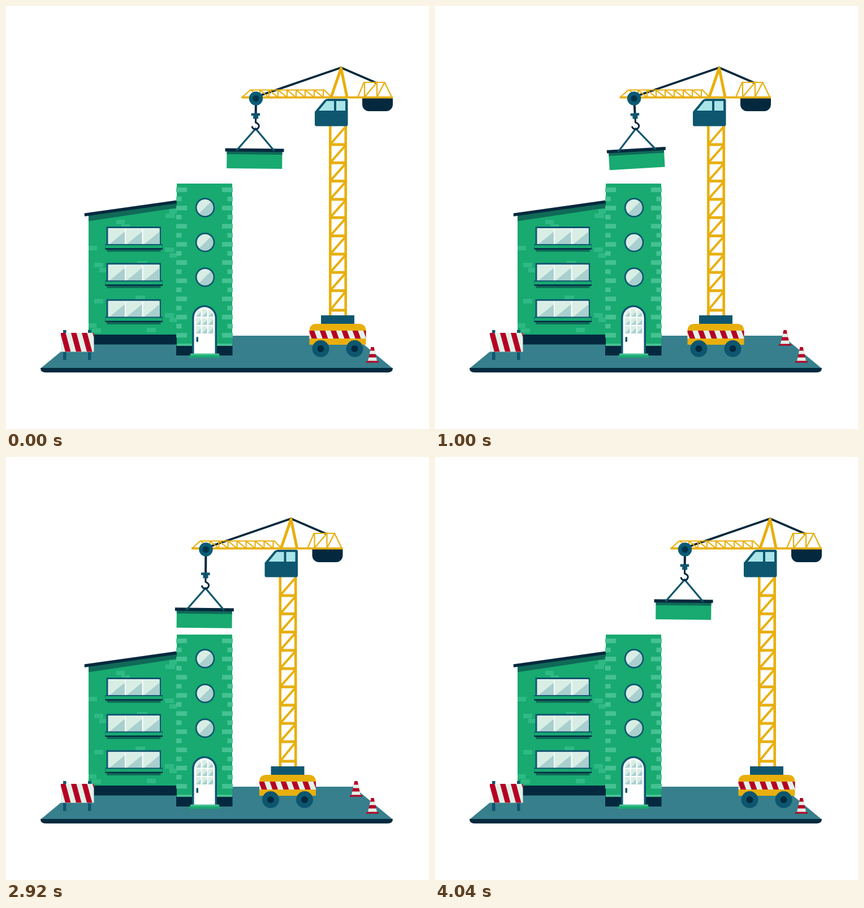
An HTML page that plays this animation: 748x748 px, repeating every 4320 ms.

```html
<!DOCTYPE html>
<html lang="en">
<head>
<meta charset="utf-8">
<title>Crane</title>
<style>
  html, body { margin: 0; width: 100%; height: 100%; overflow: hidden; background: #fff; }
  svg { display: block; width: 100vw; height: 100vh; }
</style>
</head>
<body>
<svg id="stage" viewBox="0 0 748 748"></svg>
<script>
const C = {
  green: '#18aa70', quoin: '#46c193', brick: '#2fb984', shade: '#0f6a57',
  navy: '#04293e', teal: '#0e566f', ground: '#377f8c', yellow: '#e8af0c',
  red: '#b50024', cream: '#e2f1e9', glass: '#d8eee5', tint: '#a9cfcf', sky: '#a8e4e8'
};
const LOOP = 4320, STEP = 40;

const rect = (x, y, w, h, fill, r = 0) =>
  `<rect x="${x}" y="${y}" width="${w}" height="${h}" rx="${r}" fill="${fill}"/>`;
const disc = (x, y, r, fill) => `<circle cx="${x}" cy="${y}" r="${r}" fill="${fill}"/>`;
const shape = (d, fill) => `<path d="${d}" fill="${fill}"/>`;
const line = (d, color, width, more = '') =>
  `<path d="${d}" fill="none" stroke="${color}" stroke-width="${width}" ${more}/>`;
const times = (n, fn) => Array.from({ length: n }, (_, i) => fn(i)).join('');

const ROWS = [390, 454.3, 518.5];
const ROUNDS = [356.5, 418, 479.5];
const PANES = [181, 211.5, 242.5];
const DOOR_GLASS = 'M336 549.5C336 541 343 536 351 536S366.500 541 366.500 549.500V579H336Z';

function stripes(x, y, w, h, period, lean, id) {
  return `<clipPath id="${id}"><rect x="${x}" y="${y}" width="${w}" height="${h}"/></clipPath>` +
    rect(x, y, w, h, C.cream) + `<g clip-path="url(#${id})">` +
    times(8, i => shape(`M${x - 1 + (i - 1) * period} ${y}h${period / 2}l${lean} ${h}h${-period / 2}Z`, C.red)) + '</g>';
}

function cone(x, y) {
  return `<g transform="translate(${x} ${y})">` +
    shape('M-2.500 0H2.500L8.500 27H-8.500Z', C.red) +
    shape('M-4 6.500H4L5.400 12.500H-5.400Z', C.cream) +
    shape('M-6.700 18.500H6.700L8 24.500H-8Z', C.cream) +
    rect(-11, 25, 22, 2.6, C.red) + '</g>';
}

function wideWindow(y) {
  return rect(177.5, y, 96.500, 33, C.teal) + rect(180.5, y + 3, 91, 30, '#fff') +
    PANES.map(x => rect(x, y + 4, 29, 28, C.glass) +
      shape(`M${x + 1} ${y + 32}L${x + 29} ${y + 9}V${y + 32}Z`, C.tint)).join('') +
    rect(178.5, y + 40, 95, 4.5, C.shade) +
    rect(175.5, y + 31, 101.500, 9.5, C.teal) + rect(176, y + 33, 100.500, 5, C.green) +
    rect(175.5, y + 38.5, 101.500, 2, C.navy);
}

function roundWindow(y) {
  return disc(352, y, 17.3, C.teal) + disc(352, y, 14.5, C.glass) +
    shape(`M341.700 ${y + 10.2}L362.300 ${y - 10.2}A14.500 14.500 0 0 1 341.700 ${y + 10.2}Z`, C.tint);
}

function house() {
  const bricks = [[195, 378, 15], [204, 386, 15], [282, 367, 17], [289, 359, 13], [146, 424, 15],
    [281, 427, 16], [289, 437, 13], [156, 454, 16], [165, 463, 12], [232, 451, 18], [229, 512, 17],
    [156, 518, 16], [281, 543, 16], [289, 551, 13], [146, 561, 14], [152, 570, 16], [249, 569, 16]];
  return shape('M146 371L302 348V581H146Z', C.green) +
    bricks.map(([x, y, w]) => rect(x, y, w, 8, C.brick)).join('') +
    shape('M146 370L302 348V357L146 380.500Z', C.shade) +
    shape('M138.500 366.500L302 343.500V349L139 372Z', C.navy) +
    rect(150, 581, 152, 17.5, C.navy) + ROWS.map(wideWindow).join('');
}

function tower() {
  return rect(302, 314, 98, 286, C.green) +
    times(17, i => {
      const y = 321 + i * 16.07, w = i % 2 ? 9.5 : 19;
      return rect(301, y, w, 8.2, C.quoin) + rect(401 - w, y, w, 8.2, C.quoin);
    }) +
    rect(301, 600, 99.500, 18, C.navy) + rect(302, 597, 98, 4, C.quoin) +
    ROUNDS.map(roundWindow).join('') + door();
}

function door() {
  const muntins = 'M345.500 534V579M356.500 534V579M336 550.500H367M336 565H367';
  return shape('M329 616V551A22 22 0 0 1 373 551V616Z', C.teal) +
    shape('M332.500 616V551A18.500 18.500 0 0 1 369.500 551V616Z', '#fff') +
    shape(DOOR_GLASS, C.glass) +
    `<g clip-path="url(#doorGlass)">` +
    times(3, r => times(3, c => shape(
      `M${336 + c * 10.5} ${550 + r * 14.5}l9.500 -10v10Z`, C.tint))) + '</g>' +
    line(muntins, '#fff', 2) + rect(336.5, 585, 3.5, 9, C.teal, 1.5) +
    rect(326, 614.5, 51, 4, C.quoin) + rect(324, 617.5, 54, 4.5, C.green);
}

function barrier() {
  return rect(101, 573, 5.5, 53, C.teal) + rect(145, 573, 5.5, 53, C.teal) +
    stripes(97, 578, 58.5, 33.5, 19, 9, 'board');
}

function load() {
  return rect(391.5, 256, 98, 31.5, C.green) + rect(391.5, 256, 98, 6.5, C.shade) +
    rect(388.5, 252, 104, 5.7, C.navy) +
    line('M408.500 256L442 217L475.500 256', C.teal, 3.2) +
    rect(434, 189.5, 15.5, 4.5, C.teal) + rect(437.5, 193, 9, 6.5, C.teal) +
    line('M442 199V206C447 208 449 211 447 215A6.300 6.300 0 0 1 435.500 212.500', C.navy, 3);
}

function crane() {
  const rungs = [212, ...Array.from({ length: 9 }, (_, i) => 245 + i * 32.3), 538];
  const mast = rungs.slice(1).map((y, i) =>
    line(`M573 ${y}H601`, C.yellow, 5) + line(`M574 ${y - 1}L600 ${rungs[i] + 2}`, C.yellow, 4)).join('');
  const lattice = times(8, i => `M${433 + i * 16} 148.500l16 13V148.500`);
  return line('M450 158L592.500 109L655 136', C.navy, 3.8) +
    mast + line('M573.300 210V548M600.700 210V548', C.yellow, 4.6) +
    line('M418 161L432 148.500H563L575 161' + lattice, C.yellow, 2.2) +
    line('M622 161L633 135H669.500L682 161M634 135V161L656 135V161L669 136', C.yellow, 2.2) +
    shape('M630 163H684V174A12 12 0 0 1 672 186H642A12 12 0 0 1 630 174Z', C.navy) +
    line('M575 161L592.500 110L603 161', C.yellow, 5, 'stroke-linejoin="round"') +
    line('M416.500 161.700H684', C.yellow, 3.8) +
    shape('M546 187L563 166.500Q565.500 164 569 164H601.500Q604.500 164 604.500 167V209.500Q604.500 212.500 601.500 212.500H549Q546 212.500 546 209.500Z', C.teal) +
    shape('M553 185L567 168H580V185Z', C.sky) + rect(584, 168, 16, 17, C.sky) +
    rect(557, 547, 59, 16, C.teal) +
    shape('M536.500 599V574Q537 562 549 562H624Q636 562 636.500 574V599Z', C.yellow) +
    stripes(536.5, 574, 100, 14, 19.3, 5, 'band') +
    [556.5, 616.5].map(x => disc(x, 606, 15, C.teal) + disc(x, 606, 6, C.navy)).join('') +
    `<g id="swing"><path id="rope" stroke="${C.navy}" stroke-width="4"/><g id="load">${load()}</g></g>` +
    disc(442, 163.5, 12.2, '#0a5c76') + disc(442, 163.5, 5.8, '#053348');
}

document.getElementById('stage').innerHTML =
  `<clipPath id="doorGlass"><path d="${DOOR_GLASS}"/></clipPath>` +
  `<clipPath id="allGlass"><path d="${DOOR_GLASS}"/>` +
  ROUNDS.map(y => disc(352, y, 14)).join('') +
  ROWS.map(y => PANES.map(x => rect(x, y + 4, 29, 27)).join('')).join('') + '</clipPath>' +
  shape('M131 583H614L684 641H61Z', C.ground) +
  shape('M61 640H684Q684 648 675 648H70Q61 648 61 640Z', C.navy) +
  house() + tower() + barrier() + cone(619, 573) +
  `<g clip-path="url(#allGlass)"><path id="glint" fill="#fff" opacity=".55"/></g>` +
  `<g id="crane">${crane()}</g>` + cone(648, 603);

// Tables of [ms, value]
const TRAVEL = [[340, 0], [440, 2], [500, 2.8], [520, 2.5], [610, -7], [760, -32], [880, -65],
  [920, -76], [960, -85], [1000, -90], [1040, -91.2], [1080, -90.4], [1160, -88.5],
  [3040, -88.5], [3140, -90.5], [3200, -90.5], [3280, -84], [3320, -80], [3450, -56.5],
  [3570, -23.5], [3650, -3.5], [3690, 1.5], [3730, 2.8], [3770, 2], [3850, 0]];
const ANGLE = [[320, .6], [520, 1.9], [640, 2.5], [760, 2], [880, 0], [1000, -3.3], [1050, -3.4],
  [1200, 0], [1300, 2], [1400, 1.5], [1560, .2], [1680, 0], [2740, 0], [2920, .6], [3120, 1.6],
  [3260, 2.1], [3320, 1.9], [3440, .8], [3600, -2], [3690, -3], [3800, 0], [3880, 1.3], [3960, 1.1], [4040, .6]];
const DROP = [[1600, 0], [2010, 26.8], [2730, 26.8], [3140, 0]];

// Smooth curve through the points, flat at turning points and rests
function sample(table, t) {
  const last = table.length - 1;
  if (t <= table[0][0]) return table[0][1];
  if (t >= table[last][0]) return table[last][1];
  const i = table.findIndex(p => p[0] > t) - 1;
  const slope = k => {
    if (k === 0 || k === last) return 0;
    const [a, b, c] = [table[k - 1], table[k], table[k + 1]];
    return (b[1] - a[1]) * (c[1] - b[1]) <= 0 ? 0 : (c[1] - a[1]) / (c[0] - a[0]);
  };
  const [t0, v0] = table[i], [t1, v1] = table[i + 1];
  const span = t1 - t0, u = (t - t0) / span, w = 1 - u;
  return v0 * w * w * (1 + 2 * u) + v1 * u * u * (3 - 2 * u) +
    span * u * w * (slope(i) * w - slope(i + 1) * u);
}

const part = id => document.getElementById(id);
const [craneEl, swingEl, loadEl, ropeEl, glintEl] = ['crane', 'swing', 'load', 'rope', 'glint'].map(part);

function draw(now) {
  const t = Math.floor((now % LOOP) / STEP) * STEP;
  const drop = sample(DROP, t);
  craneEl.setAttribute('transform', `translate(${sample(TRAVEL, t)} 0)`);
  swingEl.setAttribute('transform', `rotate(${sample(ANGLE, t)} 442 163)`);
  loadEl.setAttribute('transform', `translate(0 ${drop})`);
  ropeEl.setAttribute('d', `M442 163V${190 + drop}`);

  const sweeping = t > 1700 && t <= 2600;
  const front = 705 + (t - 2000) * .44 - 340;
  glintEl.setAttribute('d', sweeping ? `M${front} 340l-260 260h-27l260 -260Z` : '');
}

const start = performance.now();
function tick() {
  draw(performance.now() - start);
  requestAnimationFrame(tick);
}
tick();
</script>
</body>
</html>
```
